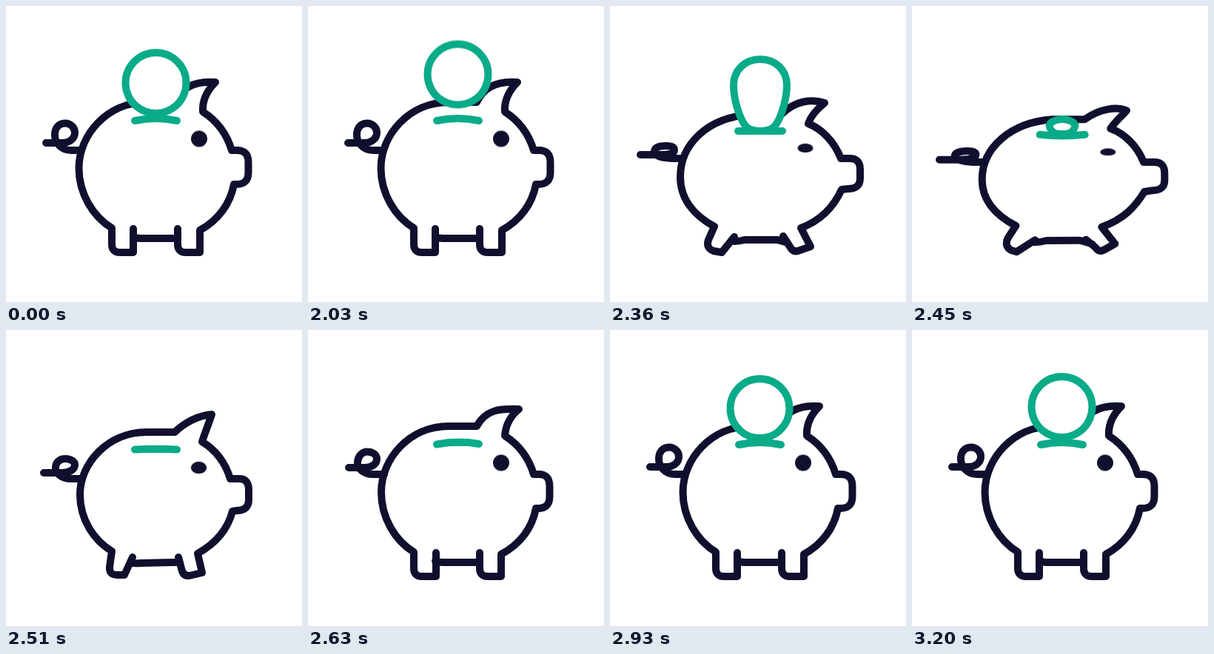
An HTML page without scripts that plays this animation: 400x400 px, repeating every 3290 ms.

```html
<!DOCTYPE html>
<html lang="en">
<head>
<meta charset="utf-8">
<title>Piggy bank</title>
<style>
html, body { margin: 0; width: 100%; height: 100%; overflow: hidden; background: #fff; }
svg { display: block; width: 100%; height: 100%; }
path { fill: none; stroke: #10102e; stroke-width: 10; stroke-linecap: round; stroke-linejoin: round; }
.eye { fill: #10102e; }
.coin, .slot { stroke: #0aab88; }
.coin { fill: #fff; }

/* Motion advances in 30 ms steps */
.body, .tail, .eye, .slot, .coin { animation: 3290ms steps(2) infinite; }
.body { animation-name: body; }
.tail { animation-name: tail; }
.eye { animation-name: eye; }
.slot { animation-name: slot; }
.coin { animation-name: melt, hop; }

@keyframes body {
  0%, 69.9%, 81.76%, 100% { d: path("M228,130 L190,130 C137,130 98.5,174 98.5,219 C98.5,254 118,285 143,300 L143,322 Q143,333 154,333 L172,333 L172,301 M172,312 Q176,314 182,314 L226,314 Q229,314 231,312 M232,301 L232,322 Q232,333 243,333 L262,333 L262,303 C286,290 303,268 308,241 L311,241 Q327.5,241 327.5,225 L327.5,211 Q327.5,195 312,195 L305,195 C298,172 285,155 266,143 C265,128 272,114 283,103 C258,101 238,108 228,130"); }
  71.73% { d: path("M232,146 L190,147 C132,150 95,187 95,231 C95,262 115,284 141,298 L133,316 Q129,327 140,331 L151,333 L168,312 M168,318 Q174,318 182,316 L226,316 Q232,317 240,320 M234,311 L243,325 Q247,333 254,331 L271,325 L258,300 C287,289 303,270 313,248 L322,247 Q338,247 338,233 L338,221 Q338,206 324,206 L312,206 C303,183 286,166 268,159 C271,149 279,140 290,131 C273,125 250,128 232,146"); }
  73.55% { animation-timing-function: steps(3); d: path("M236,161 L190,161 C130,167 92,198 92,241 C92,268 114,284 139,296 L124,311 Q117,322 127,330 L132,333 L164,321 M164,322 Q172,321 182,318 L226,318 Q234,320 248,326 M236,320 L253,328 Q259,333 264,329 L279,318 L255,297 C288,288 303,272 318,254 L330,252 Q348,252 348,239 L348,231 Q348,216 334,216 L318,216 C308,193 287,176 270,173 C276,167 285,163 296,155 C286,146 260,145 236,161"); }
  76.29% { d: path("M228,138 L190,138 C137,138 100,181 100,222 C100,257 119,284 143,299 L140,320 Q139,331 150,331 L160,331 L171,307 M168,314 Q174,316 182,315 L226,314 Q231,314 235,314 M233,307 L237,322 Q239,333 248,332 L265,328 L259,302 C284,288 300,268 306,245 L312,244 Q328,244 328,229 L328,216 Q328,201 315,201 L303,201 C296,178 283,162 265,151 C269,138 274,127 278,114 C258,116 243,124 228,138"); }
  78.11%, 79.93% { d: path("M228,130 L190,130 C137,130 99,174 99,219 C99,254 118,285 143,300 L143,322 Q143,333 154,333 L173,333 L173,301 M172,312 Q176,314 182,314 L226,314 Q229,314 231,312 M232,301 L232,322 Q232,333 243,333 L261,333 L261,303 C286,290 303,268 308,241 L311,241 Q326.5,241 326.5,225 L326.5,211 Q326.5,195 312,195 L305,195 C298,172 285,155 266,143 C267,128 274,116 285,107 C258,106 240,108 228,130"); }
}

@keyframes tail {
  0%, 69.9%, 81.76%, 100% { d: path("M102,195 L88,195 C74,195 65,184 66,172 C67,162 74,158.5 80,158.5 C88,158.5 93,165 93,171 C93,180 85,185 76,185 L54,185"); }
  71.73% { d: path("M97,206 L85,206 C70,205 60,203 60,197 C60,190 68,189 76,189 C84,189 87,191 87,195 C87,200 78,201 66,201 L41,201"); }
  73.55% { animation-timing-function: steps(3); d: path("M93,216 L80,216 C64,215 53,214 53,212 C53,208 62,207 72,207 C80,207 83,208 83,210 C83,214 72,215 58,215 L30,215"); }
  76.29% { d: path("M103,201 L88,201 C75,201 66,193 67,185 C68,177 74,174 80,174 C88,174 93,178 93,182 C93,189 85,193 76,193 L51,193"); }
  78.11%, 79.93% { d: path("M103,195 L88,195 C75,195 66,187 67,178 C68,169 74,164.5 80,164.5 C88,164.5 93,169 93,174 C93,182 85,186 76,186 L55,186"); }
}

@keyframes eye {
  0%, 69.9%, 78.11%, 100% { transform: translate(261px, 179.5px) scale(1, 1); }
  71.73% { transform: translate(264px, 192px) scale(.95, .56); }
  73.55% { transform: translate(267px, 203px) scale(.95, .3); animation-timing-function: steps(3); }
  76.29% { transform: translate(260.5px, 186px) scale(.97, .74); }
}

@keyframes slot {
  0%, 69.9%, 81.76%, 100% { d: path("M174,155 Q202.5,149 231,155"); }
  71.73% { d: path("M173,169 Q203,169 233,169"); }
  73.55% { animation-timing-function: steps(3); d: path("M172,180 Q203,186 235,180"); }
  76.29% { d: path("M174,161.5 Q203,160 231,161.5"); }
  78.11%, 79.93% { d: path("M174,154.5 Q202.5,149 231,154"); }
}

/* The coin squeezes through the slot and back out */
@keyframes melt {
  0%, 69.9%, 90.88%, 100% { d: path("M202.5,63 C225,63 243.5,81.4 243.5,104 C243.5,116 238,128 229,135.4 C221.5,141.6 212,145 202.5,145 C193,145 183.5,141.6 176,135.4 C167,128 161.5,116 161.5,104 C161.5,81.4 180,63 202.5,63"); }
  71.73% { d: path("M203,72 C225,72 239,88 239,107 C239,125 232,148 225,159 C221,167 213,169 203,169 C193,169 185,167 181,159 C174,148 167,125 167,107 C167,88 181,72 203,72"); }
  73.55% { d: path("M203,140 C216,140 225,147 225,156 C225,166 220,174 216,177 C212,180 209,180 203,180 C197,180 194,180 190,177 C186,174 181,166 181,156 C181,147 190,140 203,140"); }
  75.38% { d: path("M203,166 C207,166 212,166 216,166 C215,166 213,166 211,166 C209,166 206,166 203,166 C200,166 197,166 195,166 C193,166 191,166 190,166 C194,166 199,166 203,166"); }
  76.29% { d: path("M203,161 C207,161 212,161 216,161 C215,161 213,161 211,161 C209,161 206,161 203,161 C200,161 197,161 195,161 C193,161 191,161 190,161 C194,161 199,161 203,161"); }
  78.11%, 83.58% { animation-timing-function: steps(3); d: path("M203,152 C207,152 212,152 216,152 C215,152 213,152 211,152 C209,152 206,152 203,152 C200,152 197,152 195,152 C193,152 191,152 190,152 C194,152 199,152 203,152"); }
  86.32% { animation-timing-function: steps(3); d: path("M202.5,105 C217,105 228,114 228,126 C228,136 222,145 216,149 C211,151 207,152 202.5,152 C198,152 194,151 189,149 C183,145 177,136 177,126 C177,114 188,105 202.5,105"); }
  89.05% { d: path("M202.5,66 C225,66 242.5,84 242.5,106 C242.5,118 237,129 228,137 C221,143 212,146 202.5,146 C193,146 184,143 177,137 C168,129 162.5,118 162.5,106 C162.5,84 180,66 202.5,66"); }
}

@keyframes hop {
  0%, 60.79%, 97.26%, 100% { transform: translateY(0); animation-timing-function: steps(1); }
  61.7% { transform: translateY(-11.5px); }
  63.52% { transform: translateY(-27px); }
  65.34% { transform: translateY(-36px); }
  67.17% { transform: translateY(-32px); }
  68.99% { transform: translateY(-15px); animation-timing-function: steps(1); }
  69.9%, 89.05% { transform: translateY(0); }
  90.88% { transform: translateY(-18px); }
  92.7% { transform: translateY(-13px); }
  94.52% { transform: translateY(-5px); }
  96.35% { transform: translateY(-1px); }
}
</style>
</head>
<body>
<svg viewBox="0 0 400 400">
  <path class="tail"/>
  <path class="body"/>
  <circle class="eye" r="11"/>
  <path class="coin"/>
  <path class="slot"/>
</svg>
</body>
</html>
```
